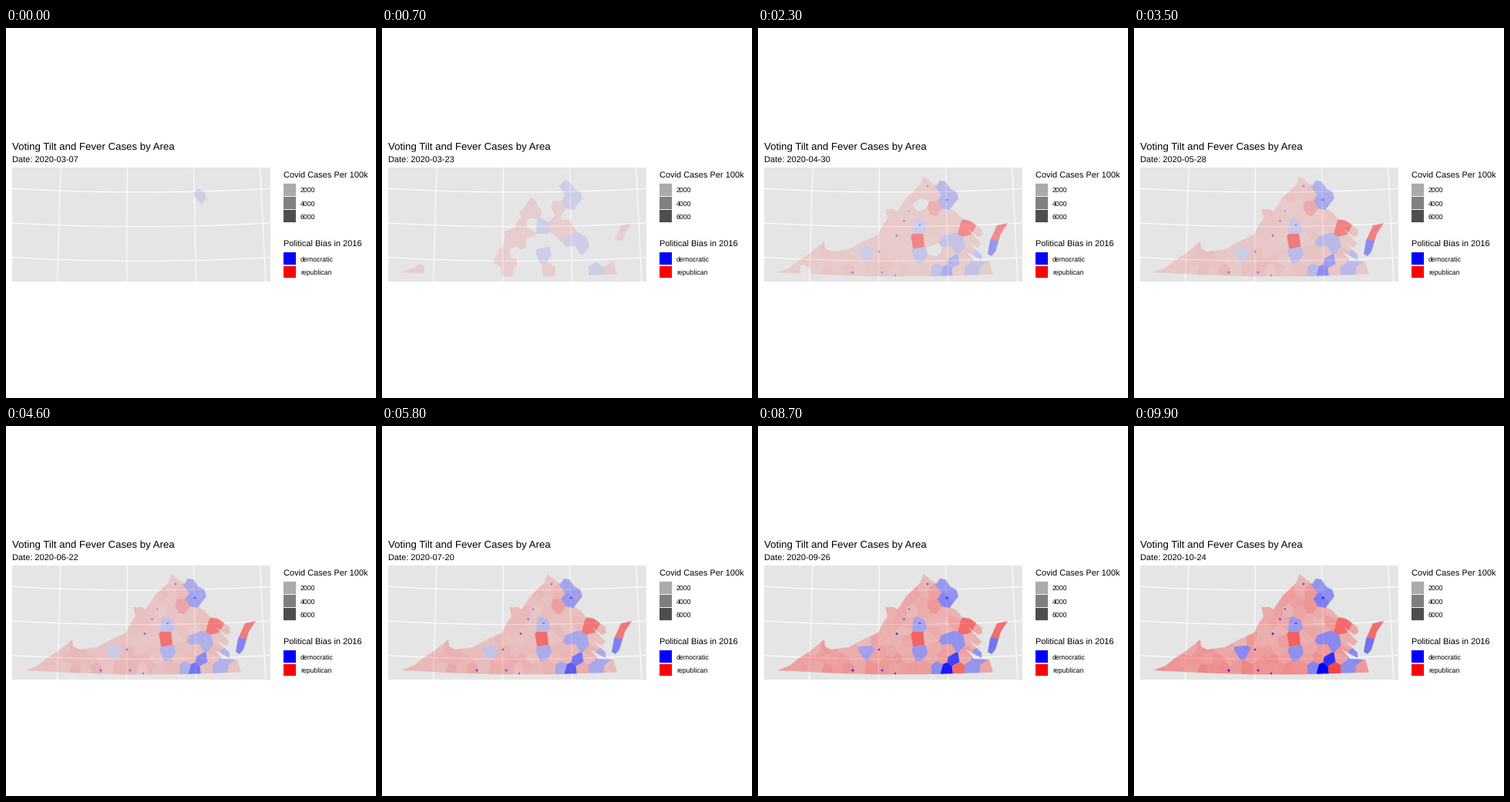
Animation of 480x480 px, one loop 10 s. Source, as a matplotlib script:

```python
import random

import numpy as np
import matplotlib.pyplot as plt
from matplotlib.animation import FuncAnimation
from matplotlib.patches import Circle, Polygon, Rectangle
from matplotlib.path import Path

FRAMES, INTERVAL = 100, 100
RED, BLUE = "#ff0000", "#0000ff"

rng = random.Random(16)
plt.rcParams.update({"font.family": "Liberation Sans", "text.hinting": "none"})
fig = plt.figure(figsize=(4.8, 4.8), dpi=100, facecolor="white")
ax = fig.add_axes([0, 0, 1, 1])
ax.set(xlim=(0, 480), ylim=(480, 0))
ax.axis("off")


def text(x, y, s, px, va="baseline"):
    return ax.text(x, y, s, fontsize=px * 0.72, va=va, color="black")


def box(x, y, w, h, color):
    patch = Rectangle((x, y), w, h, fc=color, lw=0)
    ax.add_patch(patch)
    return patch


def closed(pts):
    return Path(pts + pts[:1], closed=True)


# Panel with curved parallels and tilted meridians
panel = box(8, 181, 335, 148, "#e5e5e5")
xs = np.linspace(8, 343, 60)
grid = [(xs, y - 1.67e-4 * (xs - 175) ** 2) for y in (213, 257.6, 302.3)]
grid += [((157.2 + 86.2 * k, 156.6 + 90.1 * k), (181, 329)) for k in (-1, 0, 1, 2)]
for x, y in grid:
    line, = ax.plot(x, y, color="white", lw=0.8, zorder=2)
    line.set_clip_path(panel)

# Coastline and borders, clockwise from the western tip
mainland = closed([
    (25, 317), (41, 311), (52, 302), (66, 293), (86, 277), (87, 286), (95, 290),
    (118, 287), (136, 277), (156, 268), (161, 257), (168, 247), (165, 235),
    (176, 235), (181, 238), (193, 220), (210, 204), (215, 192), (222, 198),
    (231, 205), (236, 198), (243, 199), (250, 209), (257, 212), (260, 221),
    (249, 235), (257, 239), (265, 248), (275, 250), (290, 261), (291, 268),
    (286, 271), (272, 261), (290, 280), (285, 285), (274, 279), (290, 294),
    (290, 301), (270, 290), (280, 302), (300, 303), (305, 319.5), (260, 321),
    (215, 322.3), (155, 322.3), (95, 320.5)])
shore = closed([(310, 256), (324, 253), (315, 267), (308, 290), (303, 296),
                (298, 293), (301, 276)])
coast = Path.make_compound_path(mainland, shore)

# Counties that stand out: centre, colour, last opacity, growth exponent
MARKED = [
    (252, 219, BLUE, .38, .5), (238, 206, BLUE, .35, .5), (244, 226, BLUE, .45, .6),
    (208, 257, BLUE, .33, 1.5), (211, 293, BLUE, .37, .9), (246, 275, BLUE, .4, .9),
    (260, 284, BLUE, .4, .9), (276, 313, BLUE, .38, .8), (142, 293, BLUE, .4, 3),
    (233, 313, BLUE, .42, .9), (244, 316, BLUE, 1, .9), (254, 303, BLUE, .8, .9),
    (260, 314, RED, .7, 2.2), (208, 277, RED, .58, .2), (271, 257, RED, .54, .2),
    (309, 263, RED, .53, .2), (304, 287, BLUE, .5, .25), (286, 298, BLUE, .4, 1),
    (229, 235, RED, .35, .35)]

# Where the spread begins: one origin, then several local centres
ORIGIN = np.array((252, 219))
HUBS = np.array([(40, 313), (160, 302), (173, 278), (180, 265), (196, 235), (208, 257),
                 (235, 259), (211, 293), (215, 316), (250, 279), (276, 313),
                 (297, 309), (229, 235), (309, 263)])


def first_time(p):
    early = min(np.hypot(*(p - ORIGIN)) / 3, 4 + np.hypot(*(HUBS - p).T).min() / 4)
    late = rng.randint(14, 30) if rng.random() < .12 else rng.uniform(8, 13)
    return min(early, late) if early <= 7 else late


areas = []  # (patch, first visible time, base opacity, last opacity, exponent)


def add(patch, start, base, top, power):
    ax.add_patch(patch)
    areas.append((patch, start, base, top, power))


def seeds():
    """Marked centres, then a jittered hexagonal lattice between them."""
    yield from MARKED
    centres = np.array([m[:2] for m in MARKED])
    for row, y in enumerate(np.arange(192, 323, 12.2)):
        for x in np.arange(20 + 7 * (row % 2), 310, 14):
            p = x + rng.uniform(-3.5, 3.5), y + rng.uniform(-3, 3)
            gap = np.hypot(*(centres - p).T).min()
            if gap > 12 and mainland.contains_point(p):
                top = .27 + max(0, (y - 280) / 400) + rng.uniform(-.06, .06)
                yield (*p, RED, top, rng.uniform(.9, 2))


def nearer(poly, p, q):
    """Part of a polygon that lies closer to p than to q."""
    n, mid, out = q - p, (p + q) / 2, []
    for a, b in zip(poly, poly[1:] + poly[:1]):
        da, db = (a - mid) @ n, (b - mid) @ n
        if da <= 0:
            out.append(a)
        if da * db < 0:
            out.append(a + (b - a) * da / (da - db))
    return out


counties = list(seeds())
points = [np.array(c[:2], float) for c in counties]
for p, (_, _, color, top, power) in zip(points, counties):
    cell = [np.array(c, float) for c in ((0, 170), (350, 170), (350, 340), (0, 340))]
    for q in points:
        if q is not p:
            cell = nearer(cell, p, q)
    patch = Polygon(cell, fc=color, lw=0, zorder=3)
    add(patch, first_time(p), .1, top, power)
    patch.set_clip_path(coast, ax.transData)

# Cities
for x, y in [(196, 237.5), (210, 256), (157, 290), (245, 223), (189.5, 250.5),
             (161, 317), (178, 321), (123, 317), (220, 205), (180, 269.5)]:
    dot = Circle((x, y), rng.uniform(1, 1.5), fc=BLUE, lw=0, zorder=4)
    add(dot, rng.randint(5, 14), .25, rng.uniform(.5, .95), 1)
    dot.set_clip_path(coast, ax.transData)

# Titles and legends
text(8, 158, "Voting Tilt and Fever Cases by Area", 13.2)
date = text(8, 174, "", 11)


def legend(title, base, top, entries):
    text(359.5, base, title, 11)
    box(360, top, 16.5, 17.28 * len(entries), "#f2f2f2")
    for i, (label, color) in enumerate(entries):
        y = top + 17.28 * i
        box(360, y + .6, 16.3, 15.9, color)
        text(382, y + 9, label, 8.8, "center_baseline")


legend("Covid Cases Per 100k", 195, 201.1,
       [("2000", "#ababab"), ("4000", "#7f7f7f"), ("6000", "#4e4e4e")])
legend("Political Bias in 2016", 284, 290.7,
       [("democratic", BLUE), ("republican", RED)])


def update(i):
    day = np.datetime64("2020-03-07") + round(i * 7 / 3)
    date.set_text(f"Date: {day}")
    grown = max(0, (i - 12) / (FRAMES - 13))
    for patch, start, base, top, power in areas:
        patch.set_alpha(base + (top - base) * grown ** power if i >= start else 0)
    return [date]


anim = FuncAnimation(fig, update, frames=FRAMES, interval=INTERVAL,
                     init_func=lambda: update(0), repeat=True, repeat_delay=0)
plt.show()
```
